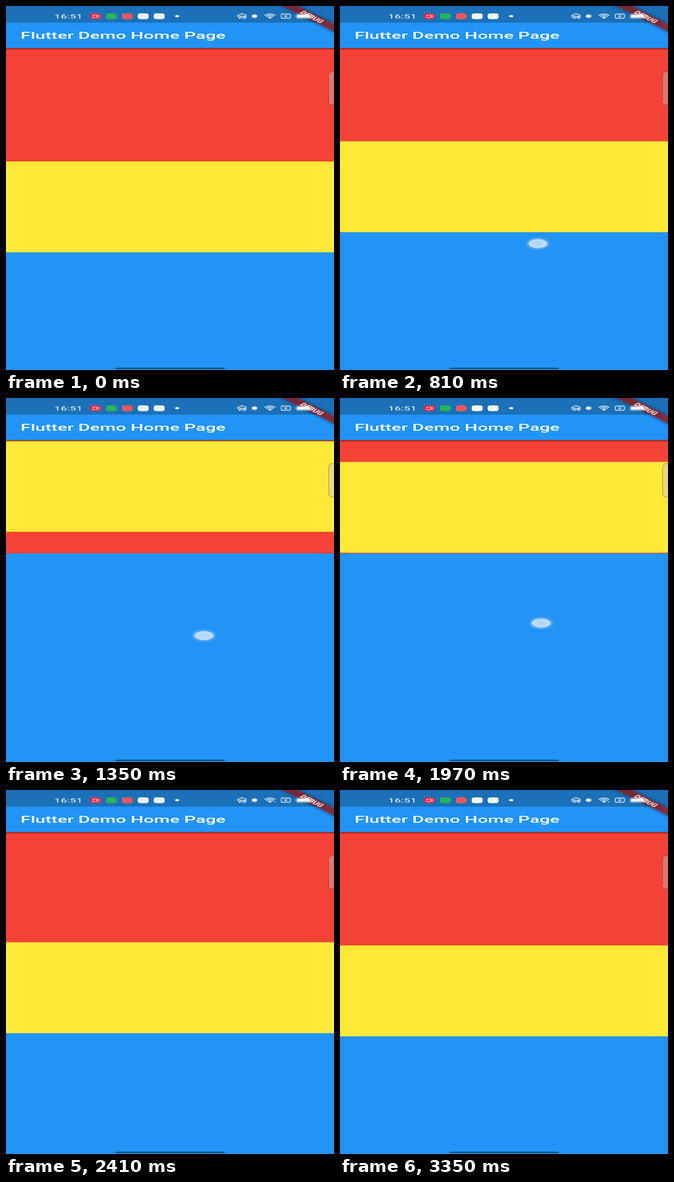
An HTML page that plays this animation: 710 px wide and 789 px high, repeating every 3.6 s.

```html
<!DOCTYPE html>
<html lang="en">
<head>
<meta charset="utf-8">
<title>Collapsing header</title>
<style>
  html, body { margin: 0; width: 100%; height: 100%; overflow: hidden; background: #2194f5; }
  svg { display: block; width: 710px; height: 789px; }
  text { font-family: Roboto, "Noto Sans", sans-serif; fill: #fff; }
  .line { fill: none; stroke: #fff; }
  #wifiData { animation: wifi 3600ms step-end infinite; }
  @keyframes wifi { 0% { opacity: 0; } 63% { opacity: .9; } }
</style>
</head>
<body>
<svg viewBox="0 0 710 789">
  <defs>
    <linearGradient id="shade" x2="0" y2="1">
      <stop offset="0" stop-color="#000" stop-opacity=".5"/>
      <stop offset=".4" stop-color="#000" stop-opacity=".18"/>
      <stop offset="1" stop-color="#000" stop-opacity="0"/>
    </linearGradient>
    <radialGradient id="glow">
      <stop offset=".7" stop-color="#8cc6fb" stop-opacity=".75"/>
      <stop offset="1" stop-color="#8cc6fb" stop-opacity="0"/>
    </radialGradient>
    <radialGradient id="tip">
      <stop offset="0" stop-color="#a9d3fa"/>
      <stop offset="1" stop-color="#c3e0fc"/>
    </radialGradient>
    <filter id="blur" x="-20%" y="-80%" width="140%" height="260%"><feGaussianBlur stdDeviation="3"/></filter>
  </defs>

  <!-- page body -->
  <rect width="710" height="789" fill="#2194f5"/>
  <rect y="91" width="710" height="246" fill="#f54236"/>
  <rect id="band" width="710" height="197" fill="#fee838"/>
  <rect y="91" width="710" height="6" fill="url(#shade)"/>

  <!-- app bar and status bar -->
  <rect width="710" height="91" fill="#2194f5"/>
  <rect width="710" height="36" fill="#1b70b8"/>

  <!-- the device's dp grid, mapped onto the stage -->
  <g transform="scale(1.972 .986)">
    <text x="16" y="71.7" font-size="20" font-weight="500">Flutter Demo Home Page</text>
    <text x="52.9" y="27" font-size="12.4" letter-spacing=".1">16:51</text>
    <g transform="translate(360 0) rotate(45)">
      <rect x="-60" y="28" width="120" height="12" opacity=".5" filter="url(#blur)"/>
      <rect x="-60" y="28" width="120" height="12" fill="#b71c1c" fill-opacity=".63"/>
      <text y="37.6" font-size="10.2" font-weight="900" text-anchor="middle" fill-opacity=".85">DEBUG</text>
    </g>
  </g>

  <!-- notifications -->
  <rect x="182" y="16" width="24" height="12.5" rx="6" fill="#f2283f"/>
  <path class="line" d="M188 19.5h8.5v5.5H188zM196.5 21.5l4-1.5v4.5l-4-1.5"/>
  <rect x="216.500" y="16" width="23.500" height="12.500" rx="5" fill="#27b45a"/>
  <rect x="251" y="16" width="23.500" height="12.500" rx="5" fill="#f0575a"/>
  <rect x="285" y="16" width="24" height="12.500" rx="5" fill="#eef5fc"/>
  <rect x="319.500" y="16" width="24" height="12.500" rx="5" fill="#eef8f0"/>
  <ellipse cx="370.500" cy="22" rx="4.500" ry="2.300" fill="#fff"/>

  <!-- system icons -->
  <path class="line" stroke-width="1.4" d="M503 24Q499 20 505 19.500Q510 14.500 516 18.500Q522 19.500 519 24"/>
  <text x="511" y="27.500" font-size="8.500" font-weight="700" text-anchor="middle">VPN</text>
  <ellipse cx="538" cy="22" rx="6" ry="3.800" fill="#fff"/>
  <path class="line" stroke-width="1.600" d="M560 20.500Q571.500 14 583 20.500M563.500 22.800Q571.500 18.300 579.500 22.800M567 25Q571.500 22.500 576 25"/>
  <ellipse cx="571.500" cy="26.300" rx="2.200" ry="1.200" fill="#fff"/>
  <path id="wifiData" d="M579 24.800h5l-2.500 2z" fill="#fff"/>
  <rect class="line" x="596" y="17.500" width="19.500" height="9" rx="1.500" stroke-width="1.500"/>
  <path class="line" stroke-width="1.200" d="M602.500 20l6 4M608.500 20l-6 4"/>
  <rect class="line" x="627.500" y="17.300" width="35" height="9.600" rx="3.500" stroke-opacity=".75"/>
  <rect x="629.500" y="18.800" width="29" height="6.600" rx="2.500" fill="#fff" fill-opacity=".95"/>
  <path d="M664.500 20q4 2 0 4z" fill="#fff" fill-opacity=".6"/>

  <!-- edge handle, home bar, finger -->
  <rect x="698.500" y="142.500" width="24" height="72" rx="7" fill="#cdc3cd" fill-opacity=".4" stroke="#5a3c3c" stroke-opacity=".6"/>
  <rect x="236.500" y="784" width="237" height="3" rx="1.500" fill="#1c4b73"/>
  <g id="finger" visibility="hidden">
    <ellipse rx="28" ry="14.500" fill="url(#glow)"/>
    <ellipse rx="21" ry="10.600" fill="url(#tip)" stroke="#5b9fe0" stroke-width="1.500"/>
  </g>
</svg>
<script>
  const LOOP = 3600, OPEN = 337, CLOSED = 91, SLOP = 18, DRAG = 70;
  const band = document.getElementById('band');
  const finger = document.getElementById('finger');

  // Each swipe: finger down, release, settle and lift times, release point, travel, fling decay.
  const swipes = [
    { down: 600, release: 810, rest: 1460, lift: 1730, x: 428.5, y: 515, travel: -60, from: OPEN, to: CLOSED, decay: 118 },
    { down: 1830, release: 1970, rest: 2730, lift: 2230, x: 435.5, y: 488, travel: 63, from: 92, to: OPEN, decay: 131 }
  ];

  function dragged(s, t) {
    const p = Math.min(1, Math.max(0, (t - s.release + DRAG) / DRAG));
    return s.travel * p * p;
  }

  function edge(s, t) {
    const pull = d => s.from + Math.sign(d) * Math.max(0, Math.abs(d) - SLOP);
    if (t < s.release) return pull(dragged(s, t));
    if (s.to === OPEN && t >= s.rest) return OPEN;
    const age = Math.min(t, s.rest) - s.release;
    return s.to + (pull(s.travel) - s.to) * Math.exp(-age / s.decay);
  }

  function draw(now) {
    const t = now % LOOP;
    const s = swipes[t < swipes[0].lift ? 0 : 1];
    band.setAttribute('y', edge(s, t).toFixed(2));
    const y = s.y - s.travel + dragged(s, t);
    finger.setAttribute('transform', `translate(${s.x} ${y.toFixed(2)})`);
    finger.setAttribute('visibility', t >= s.down && t < s.lift ? 'visible' : 'hidden');
  }

  const start = performance.now();
  function tick() {
    draw(performance.now() - start);
    requestAnimationFrame(tick);
  }
  tick();
</script>
</body>
</html>
```
